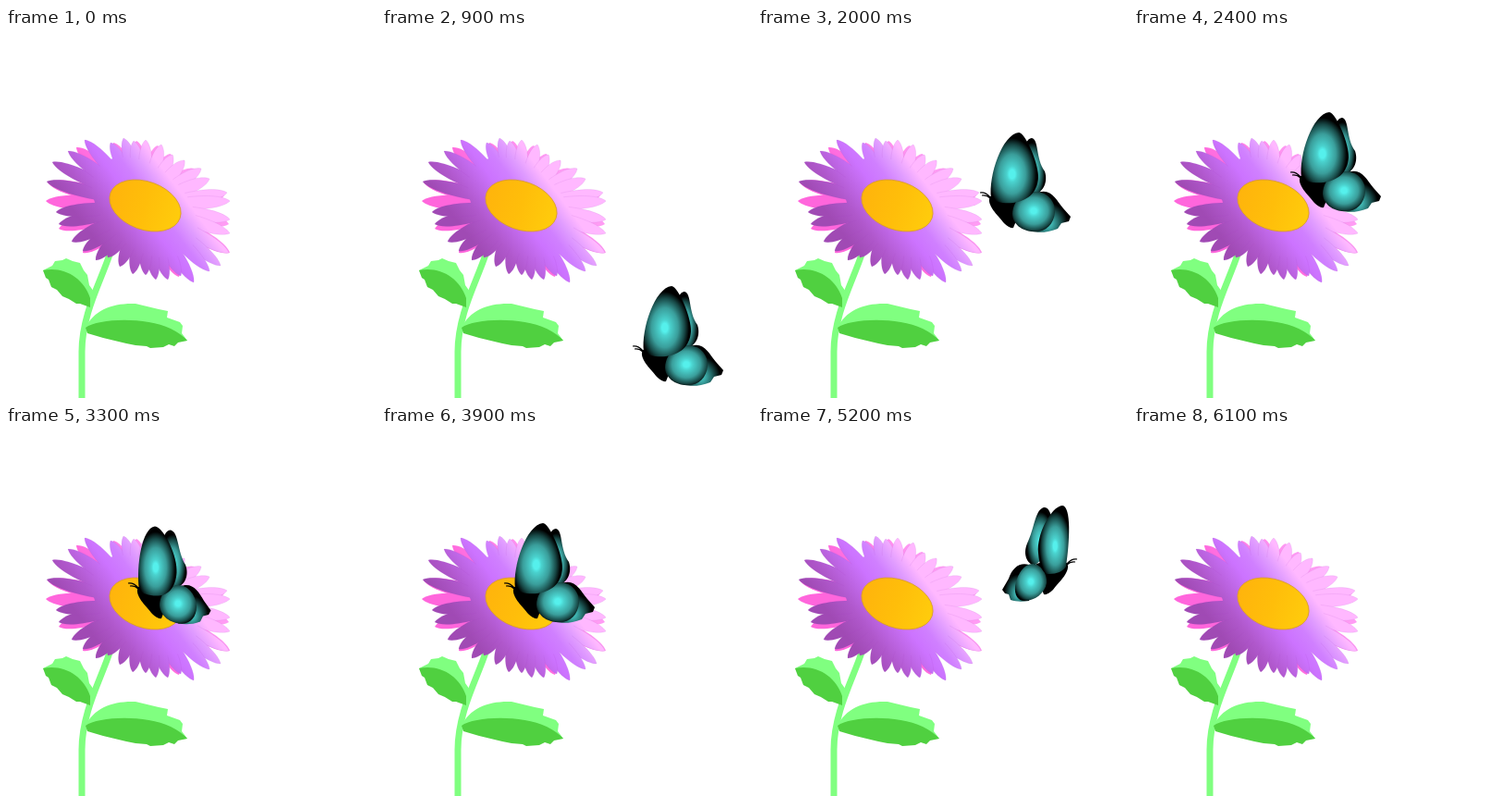
Animation, 400 px wide and 400 px high, one loop 7000 ms. Source, as an HTML page:

```html
<!DOCTYPE html>
<html lang="en">
<head>
<meta charset="utf-8">
<title>Butterfly and flower</title>
<style>
html, body { margin: 0; width: 100%; height: 100%; overflow: hidden; background: #fff; }
svg { display: block; width: 100%; height: 100%; }
</style>
</head>
<body>
<svg viewBox="0 0 400 400">
  <defs>
    <linearGradient id="frontTone" gradientUnits="userSpaceOnUse" x1="98" y1="231" x2="194" y2="159">
      <stop offset="0" stop-color="#a04ab4"/>
      <stop offset=".2" stop-color="#b058cc"/>
      <stop offset=".4" stop-color="#c46cf0"/>
      <stop offset=".48" stop-color="#cc73ff"/>
      <stop offset=".62" stop-color="#d080ff"/>
      <stop offset=".74" stop-color="#e09cff"/>
      <stop offset=".87" stop-color="#ffb8ff"/>
    </linearGradient>
    <linearGradient id="backTone" gradientUnits="userSpaceOnUse" x1="98" y1="231" x2="194" y2="159">
      <stop offset=".3" stop-color="#ff66dc"/>
      <stop offset="1" stop-color="#ff9cf4"/>
    </linearGradient>
    <linearGradient id="discTone">
      <stop offset="0" stop-color="#ffb40c"/>
      <stop offset=".5" stop-color="#ffbe0a"/>
      <stop offset="1" stop-color="#ffcc0c"/>
    </linearGradient>
    <radialGradient id="wingTone" cx=".45" cy=".59" r=".51">
      <stop offset=".12" stop-color="#55f0ec"/>
      <stop offset=".22" stop-color="#4ad2ce"/>
      <stop offset=".55" stop-color="#3a9e9b"/>
      <stop offset=".82" stop-color="#174846"/>
      <stop offset="1" stop-color="#000"/>
    </radialGradient>
    <radialGradient id="lowTone" cx=".5" cy=".48" r=".56">
      <stop offset=".12" stop-color="#55f0ec"/>
      <stop offset=".26" stop-color="#4ad2ce"/>
      <stop offset=".6" stop-color="#3a9e9b"/>
      <stop offset=".85" stop-color="#174846"/>
      <stop offset="1" stop-color="#000"/>
    </radialGradient>
    <radialGradient id="tailTone" cx=".42" cy=".78" r=".5">
      <stop offset=".2" stop-color="#3fb4b0"/>
      <stop offset=".6" stop-color="#1f5f5d"/>
      <stop offset="1" stop-color="#000"/>
    </radialGradient>
  </defs>

  <path d="M112 245C102 275 82 310 82 350V400" fill="none" stroke="#80ff80" stroke-width="7"/>
  <path fill="#80ff80" d="M40 262L50 257L53 252L61 251L65 249L72 252L80 254L84 262L88 267L90 278L95 285L94 294L90 298Z"/>
  <path fill="#50d040" d="M40 262C62 257 84 270 91 292V302L80 298L76 298L68 293L61 290L55 283L49 280L46 272L43 270Z"/>
  <path fill="#80ff80" d="M86 324C95 305 115 297 140 298L165 304L175 306L174 313L188 318L191 322L190 330L196 338Z"/>
  <path fill="#50d040" d="M86 324C100 314 150 312 178 325Q190 331 196 338L186 340L182 344L176 342L170 345L156 346L152 344L140 343L130 341L105 335L88 330Z"/>

  <g id="backPetals" fill="url(#backTone)"></g>
  <g id="frontPetals" fill="url(#frontTone)" stroke="#a040c0" stroke-opacity=".16" stroke-width=".7"></g>
  <ellipse rx="66" ry="43" transform="translate(150 194) rotate(42)" id="heart"/>
  <ellipse rx="40" ry="26" transform="translate(150.5 192) rotate(20)" fill="url(#discTone)" stroke="#d89a30" stroke-width=".8"/>

  <g id="butterfly">
    <path d="M11 4Q6 -2 0 -1M11 5Q7 1 2 2" fill="none" stroke="#000" stroke-width="1.2"/>
    <path d="M11 3C6 12 20 24 26 32Q32 38 36 37L42 22L44 4L30 0Z"/>
    <path id="backWing" fill="url(#wingTone)"/>
    <path id="tailWing" fill="url(#tailTone)"/>
    <path id="lowWing" fill="url(#lowTone)"/>
    <path id="frontWing" fill="url(#wingTone)"/>
  </g>
</svg>
<script>
const LOOP = 7000, STEP = 100, ENTER = 300, TURN = 4900, LEAVE = 6100;
const byId = id => document.getElementById(id);

// Flower
const CENTER = [150, 192];
const FRONT_TIPS = [
  [113, 124], [127, 119], [138, 122], [151, 121], [168, 126], [180, 137], [193, 143], [211, 152],
  [220, 163], [239, 178], [242, 187], [242, 207], [242, 222], [241, 243], [232, 257], [220, 263],
  [203, 275], [189, 268], [175, 272], [162, 272], [151, 267], [137, 266], [123, 258], [110, 248],
  [97, 251], [83, 241], [71, 231], [57, 212], [54, 199], [44, 166], [50, 145], [67, 133], [85, 121]
];
const BACK_TIPS = [
  [43, 187], [57, 217], [76, 129], [116, 124], [141, 122], [164, 127], [178, 136], [204, 152],
  [236, 181], [241, 212], [242, 243], [187, 269], [83, 243], [45, 167]
];

function petal([tx, ty], half) {
  const [cx, cy] = CENTER, dx = tx - cx, dy = ty - cy, len = Math.hypot(dx, dy);
  const at = (along, side) =>
    `${(cx + dx * along - dy / len * side).toFixed(1)} ${(cy + dy * along + dx / len * side).toFixed(1)} `;
  return `<path d="M${at(0, 0)}C${at(.6, -half * 1.6)}${at(.92, -half)}${at(1, 0)}` +
    `C${at(.92, half)}${at(.6, half * 1.6)}${at(0, 0)}Z"/>`;
}
byId('backPetals').innerHTML = BACK_TIPS.map(tip => petal(tip, 8)).join('');
byId('frontPetals').innerHTML = FRONT_TIPS.map(tip => petal(tip, 7.2)).join('');

// The inner petals merge into one area; its outline is sampled so the gradient stays unrotated.
const heart = byId('heart');
const outline = Array.from({ length: 48 }, (_, i) => {
  const a = i * Math.PI / 24, tilt = 42 * Math.PI / 180;
  const u = 66 * Math.cos(a), v = 43 * Math.sin(a);
  return [150 + u * Math.cos(tilt) - v * Math.sin(tilt), 194 + u * Math.sin(tilt) + v * Math.cos(tilt)]
    .map(n => n.toFixed(1)).join(' ');
});
heart.outerHTML = `<path d="M${outline.join('L')}Z" fill="url(#frontTone)"/>`;

// Wing outlines: spread and folded, measured from the antenna tip
const WINGS = {
  frontWing: [
    'M12 5C9 -20 24 -64 42 -66C50 -65 64 -30 63 -17C62 0 50 8 36 10C25 11 16 9 12 5Z',
    'M12 7C8 -20 6 -58 16 -59C28 -58 44 -28 42 -8C41 8 36 16 30 15C22 15 15 12 12 7Z'
  ],
  backWing: [
    'M44 -10C42 -45 50 -60 56 -60C64 -58 60 -38 70 -24C74 -12 68 0 56 2Z',
    'M28 -10C24 -40 28 -58 36 -57C46 -54 46 -34 54 -18C59 -6 54 4 46 6Z'
  ],
  lowWing: [
    'M35 22C36 6 48 -2 60 -2C74 -2 82 10 81 20C80 34 70 42 58 41C46 41 35 33 35 22Z',
    'M33 25C32 14 40 4 48 4C58 4 65 16 67 28C68 38 64 44 57 44C46 44 35 36 33 25Z'
  ],
  tailWing: [
    'M60 0C76 -8 82 6 90 16L98 25L96 30L88 32L84 38C72 43 62 42 56 41Z',
    'M52 5C62 2 70 8 74 20L81 32L78 36L74 37L72 43C66 45 60 45 52 44Z'
  ]
};
const FOLD = [0, .5, 1, .5, 0];

// Time, x and y of the antenna tip
const ROUTE = [
  [300, 391, 320], [500, 351, 331], [700, 311, 340], [900, 271, 345], [1000, 251, 343],
  [1300, 222, 292], [1500, 236, 257], [1800, 260, 205], [1900, 258, 190], [2100, 222, 168],
  [2300, 187, 157], [2400, 169, 157], [2500, 150, 162], [2600, 132, 171], [4100, 132, 171],
  [4600, 175, 148], [4700, 180, 150], [4800, 182, 157], [4900, 297, 161], [5200, 345, 145],
  [5600, 410, 102], [6100, 490, 48]
];

function blend(from, to, k) {
  const number = /-?\d+/g, ends = to.match(number);
  let i = 0;
  return from.replace(number, n => +n + (ends[i++] - n) * k);
}

function place(t) {
  const i = Math.max(1, ROUTE.findIndex(p => p[0] >= t));
  const [t0, x0, y0] = ROUTE[i - 1], [t1, x1, y1] = ROUTE[i];
  const k = (t - t0) / (t1 - t0);
  return [x0 + (x1 - x0) * k, y0 + (y1 - y0) * k];
}

const butterfly = byId('butterfly');
function draw(time) {
  const t = Math.floor(time % LOOP / STEP) * STEP;
  const shown = t >= ENTER && t < LEAVE;
  butterfly.style.display = shown ? '' : 'none';
  if (!shown) return;
  const [x, y] = place(t);
  butterfly.setAttribute('transform', `translate(${x} ${y}) scale(${t < TURN ? 1 : -1} 1)`);
  const fold = FOLD[t / STEP % FOLD.length];
  for (const id in WINGS) byId(id).setAttribute('d', blend(...WINGS[id], fold));
}

const start = performance.now();
function tick() {
  draw(performance.now() - start);
  requestAnimationFrame(tick);
}
tick();
</script>
</body>
</html>
```
